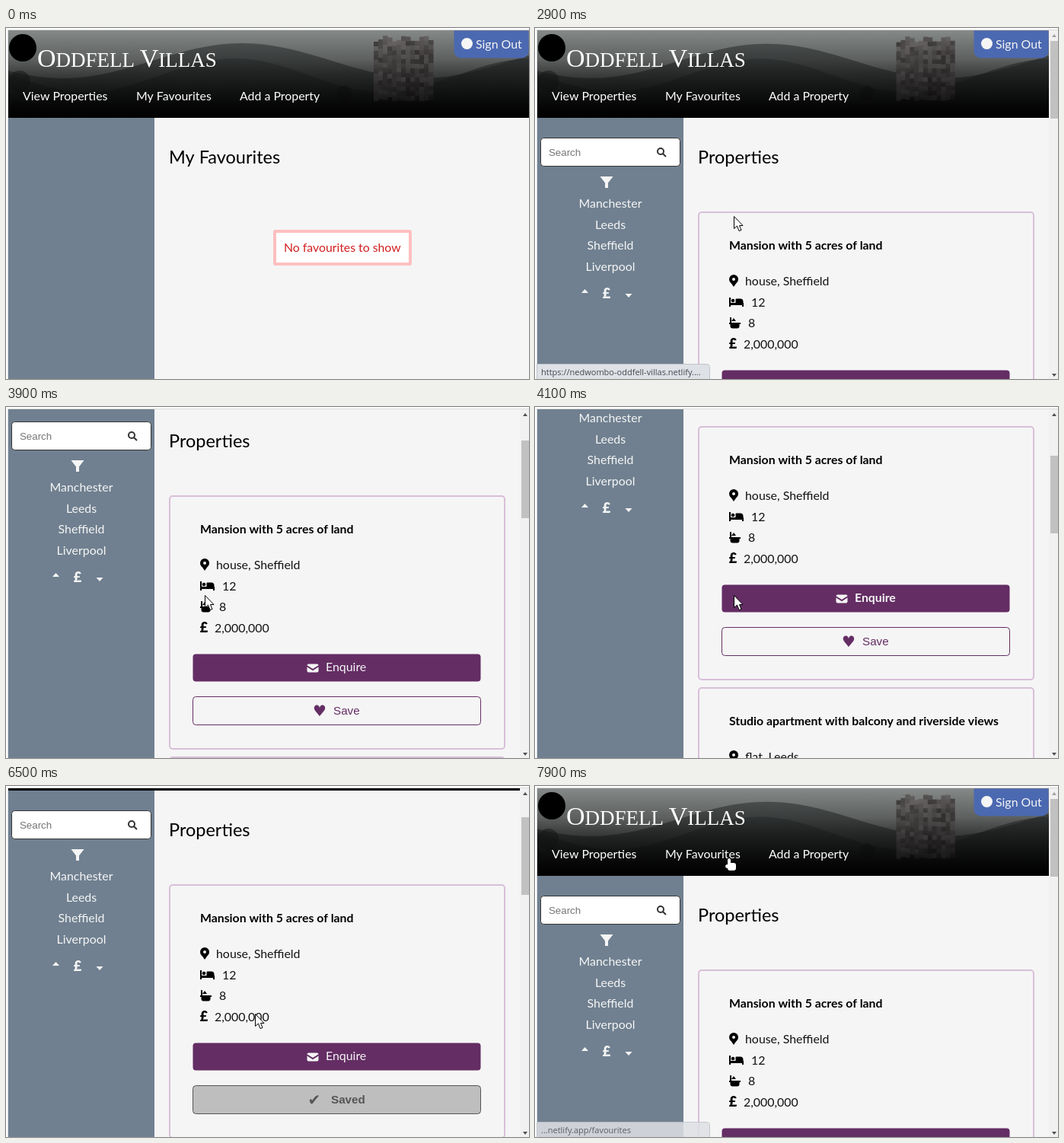
Animation, 687 px wide and 461 px high, one loop 8000 ms. Source, as an HTML page with a canvas:

```html
<!DOCTYPE html>
<html lang="en">
<head>
<meta charset="utf-8">
<title>Oddfell Villas</title>
<style>
html, body { margin: 0; width: 100%; height: 100%; overflow: hidden; background: #fff; }
canvas { display: block; }
</style>
</head>
<body>
<canvas id="stage" width="687" height="461"></canvas>
<script>
const ctx = document.getElementById('stage').getContext('2d');
const W = 687, H = 461, LOOP = 8000, STEP = 100;
const PURPLE = '#642d64', THISTLE = '#d8bfd8', SMOKE = '#f5f5f5', SLATE = '#708090';
const BODY = '15.9px Lato, sans-serif';
const BOLD = 'bold 15.8px Lato, sans-serif';
const HEADING = '23.5px Lato, sans-serif';
const POUND = '900 18px Lato, sans-serif';
const ARIAL = '15.2px "Liberation Sans", Arial, sans-serif';
const SYMBOL = '20px "DejaVu Sans", sans-serif';

const HOMES = [
  { title: 'Mansion with 5 acres of land', place: 'house, Sheffield', beds: '12', baths: '8', price: '2,000,000' },
  { title: 'Studio apartment with balcony and riverside views', place: 'flat, Leeds', beds: '1', baths: '1', price: '150,000' }
];

// --- Motion ---

const progress = (t, start, end) => Math.min(1, Math.max(0, (t - start) / (end - start)));

function scrollAt(t) {
  const down = progress(t, 3563, 4100) ** 1.18;
  const up = (1 - progress(t, 6400, 6700)) ** 1.62;
  return Math.round(216 * down * up);
}

function pointerAt(t) {
  const legs = [
    { start: 900, end: 1800, x: 95, y: 80 },
    { start: 2700, end: 2900, x: 261, y: 247 },
    { start: 4300, end: 4900, x: 327, y: 299 },
    { start: 7000, end: 7700, x: 255, y: 95 }
  ];
  let x = 58, y = -10;
  for (const leg of legs) {
    const k = progress(t, leg.start, leg.end);
    x += (leg.x - x) * k;
    y += (leg.y - y) * k;
  }
  return { x: Math.round(x), y: Math.round(y) };
}

// --- Drawing helpers ---

function rect(x, y, w, h, color) {
  ctx.fillStyle = color;
  ctx.fillRect(x, y, w, h);
}

function panel(x, y, w, h, radius, fill, stroke, line = 1) {
  ctx.beginPath();
  ctx.roundRect(x + line / 2, y + line / 2, w - line, h - line, radius);
  if (fill) { ctx.fillStyle = fill; ctx.fill(); }
  if (stroke) { ctx.strokeStyle = stroke; ctx.lineWidth = line; ctx.stroke(); }
}

function text(str, x, y, color, font = BODY, align = 'left') {
  ctx.font = font;
  ctx.fillStyle = color;
  ctx.textAlign = align;
  ctx.fillText(str, x, y);
}

function disc(x, y, r, color) {
  ctx.fillStyle = color;
  ctx.beginPath();
  ctx.arc(x, y, r, 0, 7);
  ctx.fill();
}

// Horizontal base centred on x at height y; a negative height points up.
function triangle(x, y, w, h, color) {
  ctx.fillStyle = color;
  ctx.beginPath();
  ctx.moveTo(x - w / 2, y);
  ctx.lineTo(x + w / 2, y);
  ctx.lineTo(x, y + h);
  ctx.fill();
}

function clipped(x, y, w, h, draw) {
  ctx.save();
  ctx.beginPath();
  ctx.rect(x, y, w, h);
  ctx.clip();
  draw();
  ctx.restore();
}

function fade(top, bottom, ...colors) {
  const g = ctx.createLinearGradient(0, top, 0, bottom);
  colors.forEach((color, i) => g.addColorStop(i / (colors.length - 1), color));
  return g;
}

function seeded(seed) {
  return () => (seed = seed * 16807 % 2147483647) / 2147483647;
}

// --- Header ---

function ridge(peak, length, crest, height) {
  ctx.fillStyle = fade(crest, 118, 'rgba(52,56,56,.6)', 'rgba(30,32,32,.6)');
  ctx.beginPath();
  ctx.moveTo(0, 122);
  for (let x = 0; x <= 700; x += 10) {
    ctx.lineTo(x, crest + height * (1 - Math.cos((x - peak) / length)) / 2);
  }
  ctx.lineTo(700, 122);
  ctx.fill();
}

function castle() {
  const random = seeded(7);
  for (let x = 483; x < 557; x += 6) {
    const top = 14 + 4 * Math.sin(x / 4);
    for (let y = top; y < 90; y += 6) {
      const shade = 68 + 44 * random() - (x > 522 ? 8 : 0);
      rect(x, y, 6.5, 6.5, `rgb(${shade + 4}, ${shade}, ${shade})`);
    }
  }
}

function landscape(width) {
  ctx.save();
  ctx.translate(3, 60);
  ctx.scale(width / 684, width / 684);
  ctx.translate(-3, -60);
  rect(0, 0, 700, 122, fade(3, 118, '#858a88', '#7c807e', '#5a5d5c', '#333'));
  ridge(310, 75, 20, 46);
  ridge(690, 62, 40, 44);
  castle();
  disc(18, 70, 14, 'rgba(35,38,38,.55)');
  disc(444, 86, 10, 'rgba(35,37,37,.7)');
  ctx.restore();
  rect(3, 3, width, 115, fade(3, 118, 'rgba(0,0,0,0)', 'rgba(0,0,0,.25)', 'rgba(0,0,0,.6)', '#000'));
}

function smallCaps(str, x, y) {
  for (const ch of str.toUpperCase().split(/\b/).flatMap(w => [...w].map((c, i) => [c, i ? 27 : 34]))) {
    text(ch[0], x, y, '#fff', (ch[0] === ' ' ? 27 : ch[1]) + 'px "Liberation Serif", Times, serif');
    x += ctx.measureText(ch[0]).width;
  }
}

function header(width) {
  clipped(3, 3, width, 115, () => landscape(width));
  disc(22, 26, 18, '#000');
  smallCaps('Oddfell Villas', 41, 51);
  text('View Properties', 22, 95, '#fff');
  text('My Favourites', 171, 95, '#fff');
  text('Add a Property', 307, 95, '#fff');
  const x = Math.min(width - 96, 590);
  panel(x, 3, 99, 37, [0, 0, 9, 9], '#4b69b1');
  disc(x + 17.5, 20.5, 7.5, SMOKE);
  text('Sign Out', x + 29, 27, SMOKE);
}

// --- Sidebar ---

function filters() {
  panel(7, 144, 184, 38, 4, '#fff', '#333');
  text('Search', 18, 168, '#757575', '13.3px "Liberation Sans", Arial, sans-serif');
  ctx.strokeStyle = '#333';
  ctx.lineWidth = 2;
  ctx.beginPath();
  ctx.arc(165, 162, 4, 0, 7);
  ctx.moveTo(168, 165);
  ctx.lineTo(172, 169);
  ctx.stroke();
  triangle(94, 195, 17, 11, SMOKE);
  rect(92, 200, 4, 10, SMOKE);
  ['Manchester', 'Leeds', 'Sheffield', 'Liverpool']
    .forEach((city, i) => text(city, 99, 236 + Math.round(i * 27.7), SMOKE, BODY, 'center'));
  triangle(65.5, 348, 9, -5, SMOKE);
  triangle(123, 349, 9, 5, SMOKE);
  text('£', 94, 355, SMOKE, POUND, 'center');
}

// --- Listing ---

function pin(x, y) {
  triangle(x, y, 11, 8, '#000');
  disc(x, y - 2, 6, '#000');
  disc(x, y - 2, 2, SMOKE);
}

function bed(x, y) {
  rect(x, y, 2, 12, '#000');
  rect(x, y + 7, 19, 3, '#000');
  rect(x + 17, y + 7, 2, 5, '#000');
  disc(x + 5, y + 4, 2.3, '#000');
  panel(x + 8, y + 1, 11, 7, [1, 4, 0, 0], '#000');
}

function bath(x, y) {
  rect(x + 1, y, 2, 8, '#000');
  triangle(x + 6, y + 5, 6, -4, '#000');
  rect(x, y + 7, 15, 2, '#000');
  panel(x + 1, y + 8, 13, 7, [0, 0, 3, 3], '#000');
}

function envelope(x, y) {
  panel(x, y, 16, 12, 2, SMOKE);
  ctx.strokeStyle = PURPLE;
  ctx.beginPath();
  ctx.moveTo(x, y + 3);
  ctx.lineTo(x + 8, y + 8);
  ctx.lineTo(x + 16, y + 3);
  ctx.stroke();
}

function saveButton(y, { saved, pressed, hover }) {
  if (saved) {
    panel(245, y, 379, 38, 4, '#bebebe', '#555');
    text('✔', 405, y + 26, '#555', SYMBOL, 'center');
    text('Saved', 427, y + 24, '#555', 'bold ' + ARIAL);
  } else {
    panel(245, y, 379, 38, 4, hover ? THISTLE : SMOKE, PURPLE, pressed ? 2 : 1);
    text('♥', 412, y + 26, PURPLE, SYMBOL, 'center');
    text('Save', 430, y + 24, PURPLE, (hover ? 'bold ' : '') + ARIAL);
  }
}

function card(y, home, state) {
  panel(214, y, 442, 334, 4, null, THISTLE, 2);
  text(home.title, 255, y + 50, '#000', BOLD);
  pin(261, y + 91);
  text(home.place, 276, y + 97, '#111');
  bed(255, y + 113);
  text(home.beds, 284, y + 125, '#111');
  bath(255, y + 139);
  text(home.baths, 280, y + 152, '#111');
  text('£', 260, y + 180, '#000', POUND, 'center');
  text(home.price, 274, y + 180, '#111');
  panel(245, y + 208, 379, 37, 4, PURPLE);
  envelope(395, y + 221);
  text('Enquire', 420, y + 231, SMOKE, state.enquire ? BOLD : BODY);
  saveButton(y + 264, state);
}

// --- Browser parts ---

function scrollbar(scroll) {
  rect(675, 3, 12, H, '#f1f1f1');
  rect(677, 17 + Math.round(scroll * 0.2167), 10, 102, '#c1c1c1');
  triangle(682, 12, 6, -4, scroll ? '#505050' : '#a3a3a3');
  triangle(682, 454, 6, 4, '#505050');
}

function statusBar(str, alpha) {
  ctx.globalAlpha = alpha;
  panel(2, 441, 228, 24, [0, 4, 0, 0], '#dee1e6', '#bfc3c9');
  text(str, 8, 456, '#45494e', '11px "Open Sans", sans-serif');
  ctx.globalAlpha = 1;
}

function hand(x, y) {
  const parts = [[-2, 0, 4, 12], [-5, 8, 6, 5], [-2, 6, 11, 10]];
  for (const [color, grow] of [['#000', 1], ['#fff', 0]]) {
    for (const [dx, dy, w, h] of parts) {
      panel(x + dx - grow, y + dy - grow, w + 2 * grow, h + 2 * grow, 2, color, color);
    }
  }
}

function arrow(x, y) {
  ctx.save();
  ctx.translate(x + 0.5, y + 0.5);
  const shape = new Path2D('M0 0V16L4 12.5L6.5 19L9.5 18L7 12H11.5Z');
  ctx.fillStyle = '#fff';
  ctx.strokeStyle = '#000';
  ctx.lineWidth = 1;
  ctx.fill(shape);
  ctx.stroke(shape);
  ctx.restore();
}

// --- Scene ---

function draw(t) {
  const listing = t >= 2100, loaded = t >= 2800;
  const width = loaded ? 672 : 684;
  const scroll = scrollAt(t);
  const pointer = pointerAt(t);
  const over = (top, height) => pointer.y + scroll >= top && pointer.y + scroll < top + height;

  rect(0, 0, W, H, '#fff');
  rect(2, 2, W, 1, '#d9d9d9');
  rect(2, 2, 1, H, '#d9dde1');
  clipped(3, 3, width, H, () => {
    rect(3, 3, width, H, SMOKE);
    rect(3, 3, 192, H, SLATE);
    ctx.translate(0, -scroll);
    header(width);
    text(listing ? 'Properties' : 'My Favourites', 214, 178, '#000', HEADING);
    if (listing) {
      filters();
    } else {
      panel(351, 265, 182, 47, 1, '#fff', '#ffbfbf', 4);
      text('No favourites to show', 365, 294, '#d0201f', '15.8px Lato, sans-serif');
    }
    if (loaded) {
      card(241, HOMES[0], {
        enquire: over(449, 37), hover: over(505, 38), pressed: t >= 5400, saved: t >= 5700
      });
      card(584, HOMES[1], {});
    }
  });

  if (loaded) scrollbar(scroll);
  if (t >= 2000 && t < 3400) {
    statusBar('https://nedwombo-oddfell-villas.netlify....', t < 3300 ? 1 : 0.5);
  }
  if (t >= 7900) statusBar('...netlify.app/favourites', 0.85);
  if (t >= 1000) (over(79, 22) ? hand : arrow)(pointer.x, pointer.y);
}

function tick() {
  const t = performance.now() % LOOP;
  draw(Math.floor(t / STEP) * STEP);
  requestAnimationFrame(tick);
}
tick();
</script>
</body>
</html>
```
